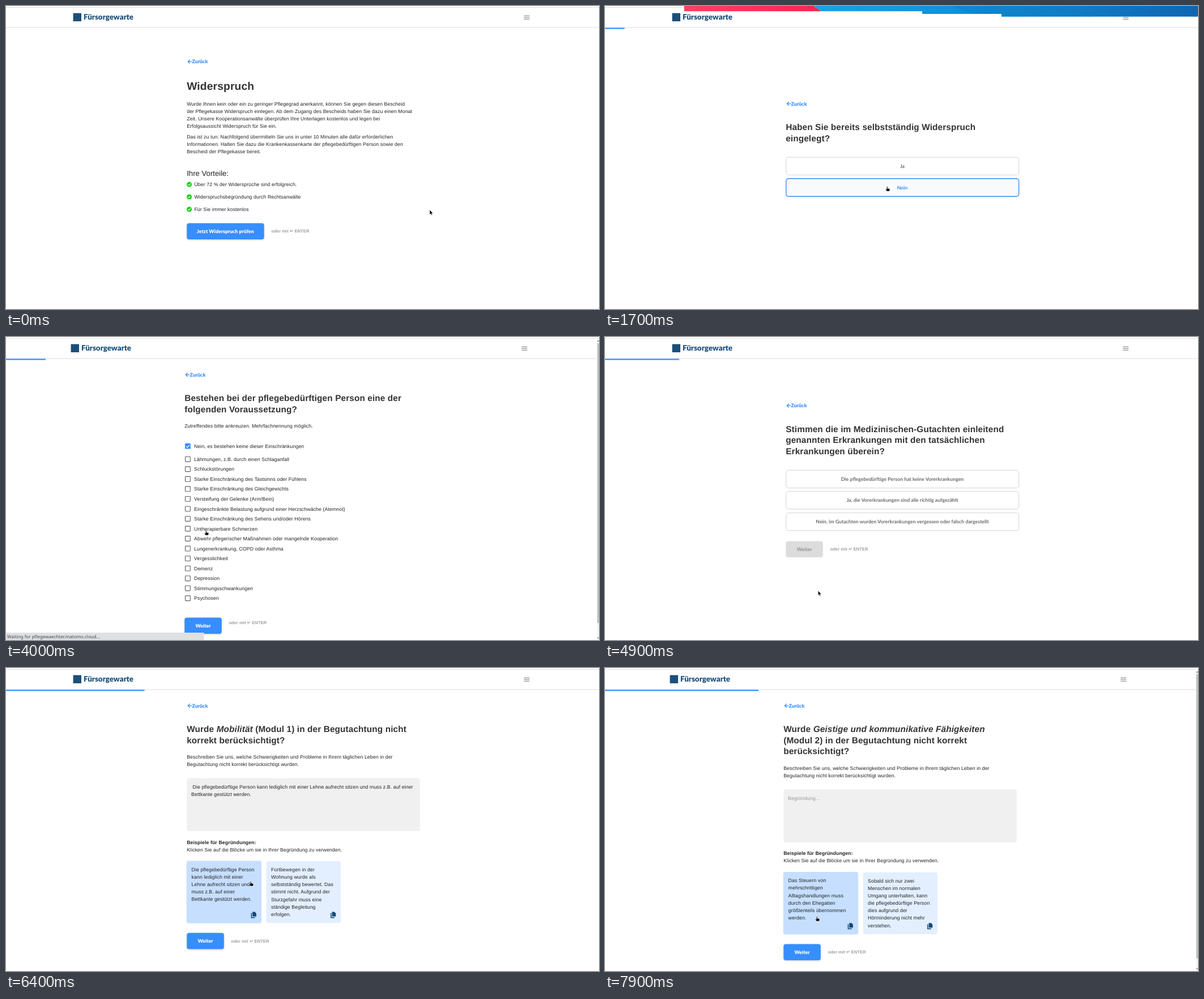
Write an HTML page that moves like this. It is 1047 by 535 pixels and loops after 8000 ms.

```html
<!DOCTYPE html>
<html lang="de">
<head>
<meta charset="utf-8">
<title>Widerspruch</title>
<style>
html, body { margin: 0; width: 100%; height: 100%; overflow: hidden; background: #fff; }
svg { display: block; width: 1047px; height: 535px; }
text {
  font: 8.776px "Liberation Sans", Arial, sans-serif;
  letter-spacing: .00938em; fill: #222; text-rendering: geometricPrecision;
}
.bold { font-weight: 700; }
.h1 { font-size: 19.25px; font-weight: 700; letter-spacing: .0075em; fill: #333; }
.h2 { font-size: 15.36px; font-weight: 700; letter-spacing: .00735em; fill: #333; }
.h5 { font-size: 13.16px; letter-spacing: 0; }
.hint { font-size: 7.68px; font-weight: 700; letter-spacing: 0; fill: #a0a0a0; }
.grey { fill: #666; }
.pale { fill: #999; }
.small { font-size: 6.58px; letter-spacing: 0; text-anchor: middle; }
.label { font-size: 6.4px; fill: #666; }
.lato { font-family: Lato, sans-serif; font-weight: 700; letter-spacing: 0; }
.heavy { font-weight: 900; }
.mid { text-anchor: middle; }
.brand { font-size: 13.4px; font-weight: 900; fill: #1b4f7a; }
.status { font: 8px "Noto Sans", sans-serif; letter-spacing: 0; fill: #444; }
.lift { filter: drop-shadow(0 1px 1.5px rgba(0, 0, 0, .22)); }
.pop { filter: drop-shadow(0 2px 3px rgba(0, 0, 0, .28)); }
</style>
</head>
<body>
<svg id="stage" viewBox="0 0 1047 535"></svg>
<script>
const LOOP = 8000, STEP = 100, LINE = 13.17, BLUE = '#368eff';
const stage = document.getElementById('stage');

// [ms, x, y, shape]
const pointer = [
  [0, 748, 360, 'arrow'], [100, 742, 356, 'arrow'], [300, 680, 345, 'arrow'],
  [600, 460, 400, 'arrow'], [700, 425, 401, 'hand'], [800, 410, 399, 'hand'],
  [1100, 410, 399, 'hand'], [1300, 440, 380, 'arrow'], [1600, 498, 324, 'hand'],
  [1700, 498, 319, 'hand'], [1800, 500, 318, 'hand'], [1900, 530, 283, 'arrow'],
  [2000, 550, 283, 'arrow'], [2300, 672, 291, 'hand'], [2400, 677, 293, 'hand'],
  [2800, 677, 293, 'hand'], [2900, 524.5, 387, 'arrow'], [3000, 500, 391, 'hand'],
  [3100, 491, 393, 'hand'], [3400, 491, 393, 'hand'], [3700, 356, 345, 'hand'],
  [4000, 353, 342, 'hand'], [4300, 353, 345, 'hand'], [4700, 350, 508, 'hand'],
  [4800, 355, 500, 'arrow'], [5200, 440, 292, 'hand'], [5300, 438, 290, 'hand'],
  [5400, 430, 300, 'hand'], [5500, 392.5, 355, 'arrow'], [5600, 362, 373, 'hand'],
  [5800, 358, 373, 'hand'], [6100, 415, 386, 'hand'], [6400, 432, 377, 'hand'],
  [7000, 400, 444, 'hand'], [7100, 365, 474, 'hand'], [7300, 358, 482, 'hand'],
  [7600, 368, 450, 'hand'], [7900, 374, 439, 'hand']
];
const progress = [
  [0, 0], [1300, 0], [1700, 34.5], [1900, 35], [2000, 38], [2400, 69.8], [4000, 70],
  [4300, 104.7], [4800, 104.7], [5200, 209.4], [5800, 209.4], [6100, 237],
  [6300, 244.5], [7500, 244.5], [7900, 271]
];

// Value of a keyed track at time t; later columns are interpolated when numeric.
function at(track, t) {
  let i = track.length - 1;
  while (track[i][0] > t) i--;
  const a = track[i], b = track[i + 1] || a;
  const p = b === a ? 0 : (t - a[0]) / (b[0] - a[0]);
  return a.map((v, k) => typeof v === 'number' ? v + (b[k] - v) * p : v);
}

const text = (x, y, s, cls = '', extra = '') =>
  `<text x="${x}" y="${y}" class="${cls}" ${extra}>${s}</text>`;
const lines = (x, y, list, cls, gap = LINE) =>
  list.map((s, i) => text(x, y + i * gap, s, cls)).join('');
const rect = (x, y, w, h, fill, r = 0, extra = '') =>
  `<rect x="${x}" y="${y}" width="${w}" height="${h}" rx="${r}" fill="${fill}" ${extra}/>`;
const path = (d, color, w = 1, extra = '') =>
  `<path d="${d}" fill="none" stroke="${color}" stroke-width="${w}" ${extra}/>`;
const circle = (x, y, r, fill, extra = '') =>
  `<circle cx="${x}" cy="${y}" r="${r}" fill="${fill}" ${extra}/>`;

const back = y =>
  path(`M328.3 ${y}H321.5M324.7 ${y - 3.4}L321.3 ${y}L324.7 ${y + 3.4}`, BLUE, 1.3) +
  text(328.6, y + 3.1, 'Zurück', 'lato heavy', `fill="${BLUE}" style="fill:${BLUE}"`);
const title = (y, list) => lines(319.2, y, list, 'h2', 19.7);
const hint = (x, y) => text(x, y, 'oder mit ↵ ENTER', 'hint');

function button(y, w, label, fill = BLUE, color = '#fff') {
  return rect(319.3, y, w, 28.5, fill, 4, fill === BLUE ? 'class="lift"' : '') +
    text(319.3 + w / 2, y + 17.4, label, 'lato heavy mid', `style="fill:${color}"`);
}
const next = (y, fill, color) => button(y, 65.5, 'Weiter', fill, color);

function option(y, label, state = 'plain') {
  const [fill, edge, w, color] = {
    plain: ['#fff', '#d4d4d4', 1, '#6b6b6b'],
    hover: ['#f8fafc', '#3a8ff2', 1.4, '#3a8ff2'],
    chosen: ['#d8e9fd', '#3a8ff2', 1.4, '#3a8ff2']
  }[state];
  return rect(319.7, y, 411, 31.4, fill, 4.4, `stroke="${edge}" stroke-width="${w}"`) +
    text(525, y + 18.9, label, 'lato mid', `style="fill:${color}"`);
}

function intro(t) {
  const perks = ['Über 72 % der Widersprüche sind erfolgreich.',
    'Widerspruchsbegründung durch Rechtsanwälte', 'Für Sie immer kostenlos'];
  return back(98.2) + text(319.2, 148.4, 'Widerspruch', 'h1') +
    lines(319.2, 175.8, [
      'Wurde Ihnen kein oder ein zu geringer Pflegegrad anerkannt, können Sie gegen diesen Bescheid',
      'der Pflegekasse Widerspruch einlegen. Ab dem Zugang des Bescheids haben Sie dazu einen Monat',
      'Zeit. Unsere Kooperationsanwälte überprüfen Ihre Unterlagen kostenlos und legen bei',
      'Erfolgsaussicht Widerspruch für Sie ein.']) +
    lines(319.2, 233.9, [
      'Das ist zu tun: Nachfolgend übermitteln Sie uns in unter 10 Minuten alle dafür erforderlichen',
      'Informationen. Halten Sie dazu die Krankenkassenkarte der pflegebedürftigen Person sowie den',
      'Bescheid der Pflegekasse bereit.']) +
    text(319.2, 300.3, 'Ihre Vorteile:', 'h5') +
    perks.map((s, i) => {
      const y = 315.1 + i * 21.94;
      return circle(323.6, y, 4.5, '#12d312') +
        path(`M321.4 ${y}l1.6 1.7l3-3.2`, '#fff', 1.1) + text(332.4, y + 3.2, s);
    }).join('') +
    button(383.4, 136.3, 'Jetzt Widerspruch prüfen', t >= 700 ? '#2f84f2' : BLUE) +
    hint(468.5, 399.8);
}

function filed(t) {
  return back(172.6) +
    title(219.2, ['Haben Sie bereits selbstständig Widerspruch', 'eingelegt?']) +
    option(267, 'Ja') + option(304.8, 'Nein', t >= 1600 ? 'hover' : 'plain');
}

function calendar() {
  const colX = c => 424.7 + 21.94 * c;
  let s = rect(403, 312, 175.5, 196, '#fff', 3, 'class="pop"') +
    text(416, 332.1, 'Mai', 'bold') + text(434.2, 332.1, '2022', 'bold') +
    '<path d="M463.7 327.8h5.6l-2.8 2.8z" fill="#666"/>' +
    path('M535.4 325.8l-3.2 3.2l3.2 3.2M560.6 325.8l3.2 3.2l-3.2 3.2', '#666', 1.1) +
    circle(490.5, 395, 9.6, '#f4f4f4', 'stroke="#777" stroke-width=".8"');
  [...'MDMDFSS'].forEach((d, c) => s += text(colX(c), 354.5, d, 'small grey'));
  for (let d = 1; d <= 31; d++) {
    const cell = d + 5;
    s += text(colX(cell % 7), 376.4 + 20.8 * Math.floor(cell / 7), d, 'small');
  }
  return s;
}

function received(t) {
  const picked = t >= 3500;
  return back(152) +
    title(198.4, ['An welchem Tag haben Sie den Bescheid der', 'Pflegekasse erhalten?']) +
    lines(319.2, 245.3, [
      'Widerspruch kann nur innerhalb eines Monats eingelegt werden. Die Widerspruchsfrist beginnt mit',
      'Zustellung des Bescheids der Pflegekasse, nicht mit Übersendung des Medizinischen Gutachtens.']) +
    rect(319.3, 280, 370.7, 32, '#f0f0f0', 4) +
    (picked
      ? text(327, 290, 'Datum des Bescheids', 'label') + text(327, 303, '05.05.2022')
      : text(327, 298, 'Datum des Bescheids', 'grey')) +
    (t >= 2300 ? circle(677.7, 295.5, 10.5, '#e9e9e9') : '') +
    rect(673.6, 291.6, 8.4, 8.6, 'none', .6, 'stroke="#555"') +
    path('M673.6 293h8.4M675.5 290v2M680 290v2', '#555', 1.3) +
    rect(678, 296.4, 2.7, 2.7, '#555') +
    (picked ? next(329.8) : next(329.8, '#dcdcdc', '#9d9d9d')) + hint(397.5, 346.5) +
    (t >= 2900 && !picked ? calendar() : '');
}

function conditions(t) {
  const items = ['Nein, es bestehen keine dieser Einschränkungen',
    'Lähmungen, z.B. durch einen Schlaganfall', 'Schluckstörungen',
    'Starke Einschränkung des Tastsinns oder Fühlens',
    'Starke Einschränkung des Gleichgewichts', 'Versteifung der Gelenke (Arm/Bein)',
    'Eingeschränkte Belastung aufgrund einer Herzschwäche (Atemnot)',
    'Starke Einschränkung des Sehens und/oder Hörens', 'Untherapierbare Schmerzen',
    'Abwehr pflegerischer Maßnahmen oder mangelnde Kooperation',
    'Lungenerkrankung, COPD oder Asthma', 'Vergesslichkeit', 'Demenz', 'Depression',
    'Stimmungsschwankungen', 'Psychosen'];
  const box = (s, i) => {
    const y = i ? 215.7 + (i - 1) * 17.54 : 192.7;
    const mark = !i && t >= 3900
      ? rect(320, y - 4.9, 9.8, 9.8, BLUE, 1.2) + path(`M321.9 ${y}l2.2 2.3l4-4.4`, '#fff', 1.2)
      : rect(320.5, y - 4.4, 8.8, 8.8, '#fff', .8, 'stroke="#606060" stroke-width="1.1"');
    return mark + text(336, y + 3.1, s);
  };
  return back(66.6) +
    title(113, ['Bestehen bei der pflegebedürftigen Person eine der', 'folgenden Voraussetzung?']) +
    text(319.2, 160, 'Zutreffendes bitte ankreuzen. Mehrfachnennung möglich.') +
    items.map(box).join('') + next(495.6) + hint(397.2, 507.2);
}

function illnesses(t) {
  const state = t >= 5400 ? 'chosen' : t >= 5100 ? 'hover' : 'plain';
  return back(121.2) +
    title(167.6, ['Stimmen die im Medizinischen-Gutachten einleitend',
      'genannten Erkrankungen mit den tatsächlichen', 'Erkrankungen überein?']) +
    option(235.2, 'Die pflegebedürftige Person hat keine Vorerkrankungen') +
    option(272.4, 'Ja, die Vorerkrankungen sind alle richtig aufgezählt', state) +
    option(310.5, 'Nein, im Gutachten wurden Vorerkrankungen vergessen oder falsch dargestellt') +
    (t >= 5600 ? next(360.4)
      : t >= 5500 ? next(360.4, '#d2dce3', '#98a2a9') : next(360.4, '#dcdcdc', '#9d9d9d')) +
    hint(397.5, 376.8);
}

function copyIcon(x, y) {
  return `<path d="M${x - 2} ${y - 5.5}h4l2.7 2.7v5.6h-6.7z" fill="#134a78"/>` +
    path(`M${x - 3.8} ${y - 3.2}v8h6.2`, '#134a78', 1.5);
}

function card(x, y, list, hot) {
  const [w, h, px, py] = hot ? [132.4, 110.4, x - .5, y - .6] : [131.4, 109.2, x, y];
  return rect(px, py, w, h, hot ? '#c6dfff' : '#e3efff', 3.5) +
    lines(x + 8.4, y + 17.9 - (hot ? .3 : 0), list) +
    copyIcon(x + 118, y + 95);
}

// Shared page for both assessment modules; dy shifts everything below the title.
function assessment(dy, heading, entry, first, second, hot) {
  return back(66.6) + title(113, heading) + `<g transform="translate(0 ${dy})">` +
    lines(319.2, 160, [
      'Beschreiben Sie uns, welche Schwierigkeiten und Probleme in Ihrem täglichen Leben in der',
      'Begutachtung nicht korrekt berücksichtigt wurden.']) +
    rect(319.3, 194.6, 411.7, 93.4, '#f0f0f0', 4) + entry +
    text(319.2, 310.8, 'Beispiele für Begründungen:', 'bold') +
    text(319.2, 323.8, 'Klicken Sie auf die Blöcke um sie in Ihrer Begründung zu verwenden.') +
    card(319.2, 341, first, hot) + card(459.6, 341, second, false) +
    next(467.7) + hint(397.5, 484.8) + '</g>';
}

const begin = text(327, 213.3, 'Begründung...', 'pale');

function mobility(t) {
  const entry = t < 6200 ? begin
    : text(329.5, 213.3, 'Die pflegebedürftige Person kann lediglich mit einer Lehne aufrecht sitzen und muss z.B. auf einer') +
      text(327, 225.9, 'Bettkante gestützt werden.');
  return assessment(0,
    ['Wurde <tspan font-style="italic">Mobilität</tspan> (Modul 1) in der Begutachtung nicht',
      'korrekt berücksichtigt?'], entry,
    ['Die pflegebedürftige Person', 'kann lediglich mit einer', 'Lehne aufrecht sitzen und',
      'muss z.B. auf einer', 'Bettkante gestützt werden.'],
    ['Fortbewegen in der', 'Wohnung wurde als', 'selbstständig bewertet. Das', 'stimmt nicht. Aufgrund der',
      'Sturzgefahr muss eine', 'ständige Begleitung', 'erfolgen.'],
    t >= 6000 && t < 7100);
}

function mental(t) {
  return assessment(19.7,
    ['Wurde <tspan font-style="italic">Geistige und kommunikative Fähigkeiten</tspan>',
      '(Modul 2) in der Begutachtung nicht korrekt', 'berücksichtigt?'], begin,
    ['Das Steuern von', 'mehrschrittigen', 'Alltagshandlungen muss', 'durch den Ehegatten',
      'größtenteils übernommen', 'werden.'],
    ['Sobald sich nur zwei', 'Menschen im normalen', 'Umgang unterhalten, kann', 'die pflegebedürftige Person',
      'dies aufgrund der', 'Hörminderung nicht mehr', 'verstehen.'],
    t >= 7500);
}

// [start, page, end of scrollbar thumb or 0]
const pages = [
  [0, intro, 0], [1200, filed, 0], [1900, received, 0], [3800, conditions, 505],
  [4800, illnesses, 0], [5800, mobility, 0], [7300, mental, 513]
];

const header = rect(118.6, 12.6, 14.4, 14.4, '#1b4f7a') +
  text(137, 24.2, 'Fürsorgewarte', 'lato brand') +
  path('M914.4 17.4h10M914.4 20.3h10M914.4 23.2h10', '#777', 1);

const scrollbar = end => rect(1043.4, 2, 3.6, 533, '#f3f3f3') +
  rect(1043.9, 11, 3.1, end - 11, '#c1c1c1') +
  '<path d="M1044 8l1.5-2l1.5 2zM1044 530.5l1.5 2l1.5-2z" fill="#555"/>';

const banner = `<defs>
  <linearGradient id="red"><stop stop-color="#ff3f60"/><stop offset="1" stop-color="#f9244f"/></linearGradient>
  <linearGradient id="sky"><stop stop-color="#18a3e0"/><stop offset=".4" stop-color="#128fd4"/>
  <stop offset="1" stop-color="#0f66b2"/></linearGradient></defs>
  <path d="M368 0H1047V18.7H700V14H560V9.3H382z" fill="url(#sky)"/>
  <path d="M610 0H790L860 18.7H700V14H650z" fill="#0f7cc4" opacity=".45"/>
  <path d="M139.7 0H368L382 9.3H139.7z" fill="url(#red)"/>`;

const shapes = {
  arrow: '<path d="M0 0V8.3L1.9 6.6L3.2 9.5L4.6 8.9L3.3 6.1H5.9z" fill="#000" stroke="#fff" stroke-width=".5"/>',
  hand: '<path d="M-.5 0Q.6-.7 1 .5V3L4 3.6Q5 4 4.8 5.3L4.2 8H-.6L-2.7 5Q-2.4 3.8-.8 4.9z" fill="#000" stroke="#fff" stroke-width=".5"/>'
};

function draw(t) {
  const [, page, thumb] = pages.filter(p => p[0] <= t).pop();
  const [, x, y, shape] = at(pointer, t);
  const width = thumb ? 1043.4 : 1047;
  return `<g transform="translate(${thumb ? -4 : 0} 0)">${header}${page(t)}</g>` +
    rect(0, 2, width, 1, '#e0e0e0') + rect(0, 37.6, width, 1, '#dcdcdc') +
    rect(0, 38.4, at(progress, t)[1], 2.2, BLUE) +
    (thumb ? scrollbar(thumb) : '') +
    (t >= 3900 && t < 4500
      ? rect(0, 522, 349.5, 13, '#dee0e3') + text(2, 532, 'Waiting for pflegewaechter.matomo.cloud…', 'status')
      : '') +
    (t >= 1600 && t < 2000 ? banner : '') +
    `<g transform="translate(${x} ${y})">${shapes[shape]}</g>`;
}

let shown = -1;
function tick() {
  const t = Math.floor(performance.now() % LOOP / STEP) * STEP;
  if (t !== shown) stage.innerHTML = draw(shown = t);
  requestAnimationFrame(tick);
}
tick();
</script>
</body>
</html>
```
